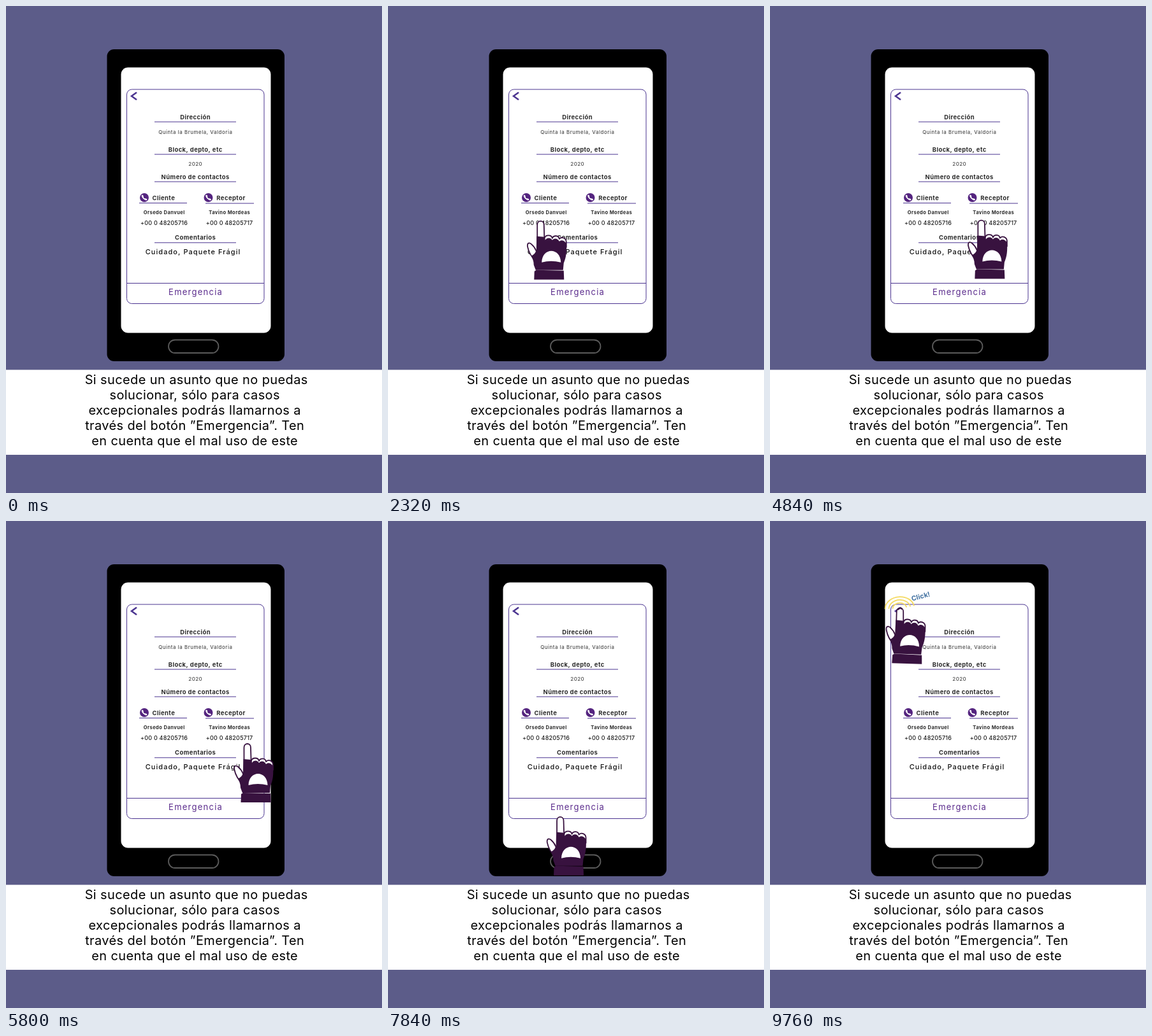
An HTML page with a canvas that plays this animation: 590x765 px, repeating every 10000 ms.

```html
<!DOCTYPE html>
<html lang="es">
<head>
<meta charset="utf-8">
<title>Emergencia</title>
<style>
html, body { margin: 0; width: 100%; height: 100%; overflow: hidden; background: #5c5c89; }
canvas { display: block; }
</style>
</head>
<body>
<canvas id="stage" width="590" height="765"></canvas>
<script>
const ctx = document.getElementById('stage').getContext('2d');
const LOOP = 10000, STEP = 40;
const PURPLE = '#4b3490', HAND = '#38123f', INK = '#2b2b2b';

// Hand path: time, left, top
const path = [
  [40, 590, 396], [1080, 229, 308], [1920, 227, 331], [2080, 227, 331],
  [2720, 197, 350], [3520, 253, 352], [4080, 330, 311], [4280, 330, 311],
  [5240, 298, 350], [5320, 298, 350], [5800, 357, 349], [5840, 357, 349],
  [5960, 364, 350], [6600, 220, 395], [7340, 315, 401], [7960, 242, 470],
  [8720, 310, 469.5], [8760, 310, 469.5], [9400, 181, 143], [9480, 181, 150],
  [9640, 180, 131]
];

const ease = p => (1 - Math.cos(Math.PI * p)) / 2;
const clamp = p => Math.max(0, Math.min(1, p));

function handAt(t) {
  const i = path.findIndex(k => k[0] > t);
  if (i < 0) return path[path.length - 1].slice(1);
  const [t0, x0, y0] = path[i - 1], [t1, x1, y1] = path[i];
  const p = ease((t - t0) / (t1 - t0));
  return [x0 + (x1 - x0) * p, y0 + (y1 - y0) * p];
}

function text(str, x, y, size, weight, color, spacing) {
  ctx.font = `${weight} ${size}px Inter, sans-serif`;
  ctx.letterSpacing = spacing + 'px';
  ctx.fillStyle = color;
  ctx.textAlign = 'center';
  ctx.fillText(str, x + spacing / 2, y);
}

function box(x, y, w, h, r, fill, stroke, width) {
  ctx.beginPath();
  ctx.roundRect(x, y, w, h, r);
  if (fill) { ctx.fillStyle = fill; ctx.fill(); }
  if (stroke) { ctx.strokeStyle = stroke; ctx.lineWidth = width; ctx.stroke(); }
}

function line(x0, x1, y) {
  ctx.beginPath();
  ctx.moveTo(x0, y);
  ctx.lineTo(x1, y);
  ctx.strokeStyle = PURPLE;
  ctx.lineWidth = 1;
  ctx.stroke();
}

function shape(d, fill, stroke, width = 1.8) {
  const p = new Path2D(d);
  if (fill) { ctx.fillStyle = fill; ctx.fill(p); }
  if (stroke) { ctx.strokeStyle = stroke; ctx.lineWidth = width; ctx.stroke(p); }
}

function heading(str, y) {
  text(str, 297, y, 9.5, 700, INK, 0.4);
  line(233, 361, y + 4.5);
}

function callIcon(x, y) {
  ctx.save();
  ctx.translate(x, y);
  box(-7, -7, 14, 14, 7, '#54247f');
  ctx.lineCap = 'round';
  shape('M-3 -2.8 Q-2.2 2.2 2.8 3', null, '#fff', 1.7);
  shape('M-3 -3 L-2.5 -1.4 M1.4 2.5 L3 3', null, '#fff', 2.6);
  ctx.restore();
}

function contact(iconX, labelX, mid, x0, x1, y, role, name, phone) {
  callIcon(iconX, 301);
  text(role, labelX, 305, 9.5, 700, INK, 0.4);
  line(x0, x1, y);
  text(name, mid, 327, 7.6, 700, INK, 0.4);
  text(phone, mid, 343.5, 9, 500, '#1c1c1c', 0.22);
}

function scene() {
  ctx.fillStyle = '#5c5c89';
  ctx.fillRect(0, 0, 590, 765);
  box(158.5, 68, 278.5, 490, 11, '#000');
  box(180.5, 96.5, 235, 417, 11, '#fff');
  box(255, 524.5, 78.5, 20.5, 10.2, null, '#5b5b5b', 1.8);
  box(189.5, 131, 215.5, 336.5, 8, null, PURPLE, 1);
  line(190, 405, 435.5);
  shape('M205 135.8 L197 141.5 L205 147.2', null, PURPLE, 2.5);

  heading('Dirección', 177.5);
  text('Quinta la Brumela, Valdoria', 297, 200.5, 7.8, 500, '#4a4a4a', 0.58);
  heading('Block, depto, etc', 228.5);
  text('2020', 297, 250.5, 8, 500, '#4a4a4a', 0.4);
  heading('Número de contactos', 271.5);
  contact(217, 247.2, 248, 209, 284, 309.5, 'Cliente', 'Orsedo Danvuel', '+00 0 48205716');
  contact(317.5, 352.8, 350.5, 313, 389, 310, 'Receptor', 'Tavino Mordeas', '+00 0 48205717');
  heading('Comentarios', 367.3);
  text('Cuidado, Paquete Frágil', 293, 389.5, 11, 500, '#111', 1.05);
  text('Emergencia', 297, 454, 13, 400, '#5a2b8c', 1.25);

  ctx.fillStyle = '#fff';
  ctx.fillRect(0, 571.5, 590, 133.5);
  [
    'Si sucede un asunto que no puedas',
    'solucionar, sólo para casos',
    'excepcionales podrás llamarnos a',
    'través del botón ”Emergencia”. Ten',
    'en cuenta que el mal uso de este'
  ].forEach((str, i) => text(str, i ? 296 : 298.5, 594 + 24 * i, 20, 400, '#000', 0.38));
}

function hand(x, y, press) {
  ctx.save();
  ctx.translate(x, y);
  ctx.translate(35, 86);
  ctx.rotate(press * 0.03);
  ctx.translate(-35, -86);
  ctx.lineJoin = 'round';
  const tip = 1 + 5 * press;
  // index finger and thumb
  shape(`M16.5 42 L16.5 ${tip + 6} C16.5 ${tip - 2} 27 ${tip - 2} 27 ${tip + 6} L28 42 Z`, '#fff', HAND);
  if (press) shape(`M18 ${tip + 3} Q22 ${tip - 2} 25 ${tip + 2}`, null, HAND, 2.5 * press);
  shape('M14 64 C7 57 3 50 1.2 41 C0.5 35 4 34.5 7 37 C10 39.5 13 43 15 48 Z', '#fff', HAND);
  // three folded fingers
  shape('M27 36 L28 28 C29 22 39 22 40 28 C42 23 50 23 51 29 C54 25 62 27 62 34 L62 42 Z', '#fff', HAND);
  // fist
  shape('M15.5 25 L27.8 26 L29 31 C32 26 38 27 40 31 C43 27 49 28 51 33 ' +
    'C54 30 59 31 62 36 C63 48 62 58 58 67 L57 78 L14 78 L11 70 ' +
    'C11 64 9 60 7 56 C11 54 14 51 15 47 Z', HAND);
  shape('M23.5 66 C24 42 53 42 53.5 66 Q38 62 23.5 66 Z', '#fff');
  shape('M12 80 L15 78 L58 79 L58.5 93 L11.5 93 Z', HAND);
  ctx.restore();
}

function click(t) {
  [11, 17, 23].forEach((r, i) => {
    const p = clamp((t - 9560 - 40 * i) / 80);
    if (!p) return;
    ctx.globalAlpha = p;
    ctx.beginPath();
    ctx.ellipse(203.5, 137.5, r, r * 0.8, -0.08, Math.PI * 1.02, Math.PI * 1.96);
    ctx.strokeStyle = '#f4da63';
    ctx.lineWidth = 1.8;
    ctx.stroke();
  });
  ctx.globalAlpha = clamp((t - 9640) / 80);
  ctx.save();
  ctx.translate(236.5, 118.5);
  ctx.rotate(-0.26);
  text('Click!', 0, 3.5, 10.5, 700, '#3f6f9f', 0.1);
  ctx.restore();
  ctx.globalAlpha = 1;
}

function frame() {
  const t = Math.floor(performance.now() % LOOP / STEP) * STEP;
  scene();
  if (t > 9560) click(t);
  if (t >= 80) hand(...handAt(t), clamp((t - 9600) / 120));
  requestAnimationFrame(frame);
}
frame();
</script>
</body>
</html>
```
